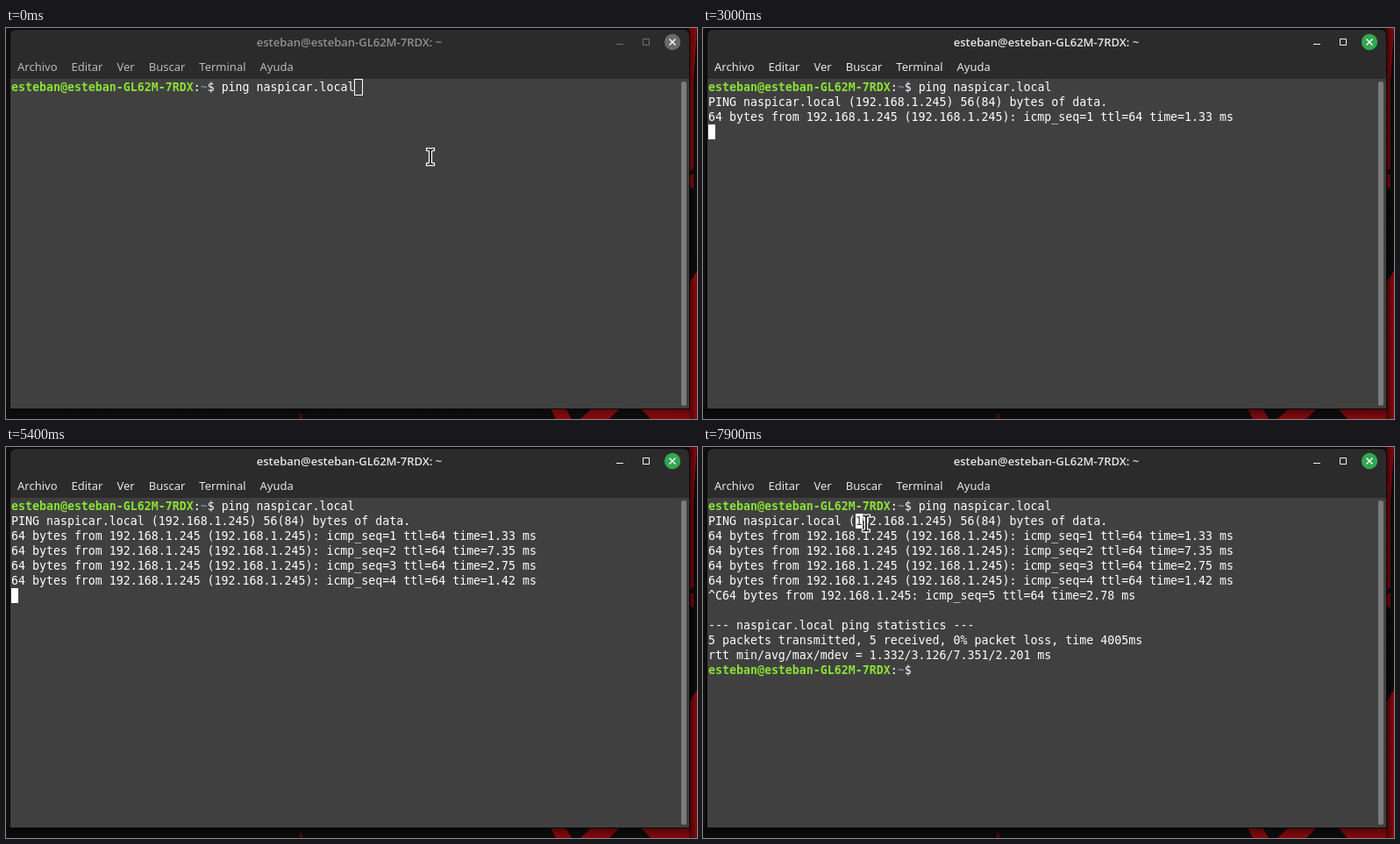
Write an HTML page that moves like this. It is 788 px wide and 446 px high and loops after 8000 ms.

```html
<!DOCTYPE html>
<html lang="es">
<head>
<meta charset="utf-8">
<title>Terminal</title>
<style>
  html, body { margin: 0; width: 100%; height: 100%; overflow: hidden; background: #0e0e0f; }
  svg, #title, #menu, #rows, #caret { position: absolute; }
  svg { left: 0; top: 0; }
  #title, #menu { font: 13px/18px "Noto Sans", "Open Sans", sans-serif; white-space: pre; }
  #title { left: 5px; top: 7px; width: 773px; text-align: center; color: #909090;
           font-family: "Open Sans", "Noto Sans", sans-serif; font-weight: 600; }
  #menu { left: 13px; top: 35px; display: flex; gap: 16px; color: #b9b9b9; }
  .icon { stroke: #707070; fill: none; }
  .close { fill: #696969; }
  .shade { opacity: .75; }
  .focus #title, .focus #menu { color: #e6e6e6; }
  .focus .icon { stroke: #f2f2f2; }
  .focus .close { fill: #33a652; }
  .focus .shade { opacity: 1; }
  /* this size gives an advance of 8px per character */
  #rows { left: 6px; top: 59px; color: #fff; white-space: pre;
          font: 13.288px/17px "DejaVu Sans Mono", monospace; }
  #rows div { height: 17px; }
  .user { font-weight: bold; color: #8ae234; }
  .path { color: #729fcf; }
  #pick { display: inline-block; }
  #pick.on { background: #fff; color: #404040; }
  #caret { width: 8px; height: 17px; box-shadow: 0 0 0 1px #fff; }
  .focus #caret { background: #fff; box-shadow: none; }
</style>
</head>
<body>
<svg width="788" height="446">
  <defs>
    <linearGradient id="sideShade">
      <stop offset="0" stop-opacity=".6"/>
      <stop offset="1" stop-opacity=".12"/>
    </linearGradient>
    <linearGradient id="baseShade" x2="0" y2="1">
      <stop offset="0" stop-opacity=".5"/>
      <stop offset="1" stop-opacity=".12"/>
    </linearGradient>
  </defs>
  <g fill="#990b10">
    <path d="M779 0H788L784 62V160L779 164Z"/>
    <path d="M779 168L784 166V184L779 180Z"/>
    <path d="M788 277L779 291V446H788Z"/>
    <path d="M621 434H638L645 446H627Z"/>
    <path d="M668 434H700L688 446H655Z"/>
    <path d="M724 434H788V446H735Z"/>
    <path d="M334 439L338 441V446H335Z" opacity=".5"/>
  </g>
  <g class="shade">
    <rect x="779" width="9" height="446" fill="url(#sideShade)"/>
    <rect y="434" width="779" height="12" fill="url(#baseShade)"/>
  </g>
  <path d="M4 435V9Q4 1 12 1H772Q780 1 780 9V435Z" fill="#080808"/>
  <path d="M5 434V9Q5 2 12 2H772Q779 2 779 9V434Z" fill="#2b2b2b"/>
  <rect x="5" y="58" width="774" height="376" fill="#404040"/>
  <rect x="770" y="61" width="6" height="370" rx="3" fill="#7b7b7b"/>
  <path class="icon" d="M696 18.5H704M726.5 12.5H733.5V19.5H726.5Z"/>
  <circle class="close" cx="760" cy="16" r="9.2"/>
  <path d="M756.5 12.5L763.5 19.5M763.5 12.5L756.5 19.5" stroke="#fff" stroke-width="1.4"/>
</svg>

<div id="title">esteban@esteban-GL62M-7RDX: ~</div>
<div id="menu"></div>
<div id="caret"></div>
<div id="rows"></div>

<svg width="788" height="446">
  <defs>
    <path id="beam" d="M-3 -8.5H-1.5L0 -7.5L1.5 -8.5H3M0 -7.5V7.5M-3 8.5H-1.5L0 7.5L1.5 8.5H3"/>
  </defs>
  <g id="pointer" fill="none" stroke-linecap="square">
    <use href="#beam" stroke="#fff" stroke-width="4.2"/>
    <use href="#beam" stroke="#111" stroke-width="1.7"/>
  </g>
</svg>
<script>
const LOOP = 8000, STEP = 100, BLINK = 600;
const FOCUS = 500, ENTER = 1800, FIRST_REPLY = 2100, STOP = 6000, DONE = 6100;
const MOVE = 6200, SELECT = 7800;
const $ = id => document.getElementById(id);

const host = 'naspicar.local', ip = '192.168.1.245';
const prompt = '<span class="user">esteban@esteban-GL62M-7RDX</span>:<span class="path">~</span>$ ';
const reply = (ms, i) => `64 bytes from ${ip} (${ip}): icmp_seq=${i + 1} ttl=64 time=${ms} ms`;

const lines = [
  prompt + 'ping ' + host,
  `PING ${host} (<span id="pick">1</span>${ip.slice(1)}) 56(84) bytes of data.`,
  ...['1.33', '7.35', '2.75', '1.42'].map(reply),
  `^C64 bytes from ${ip}: icmp_seq=5 ttl=64 time=2.78 ms`,
  '',
  `--- ${host} ping statistics ---`,
  '5 packets transmitted, 5 received, 0% packet loss, time 4005ms',
  'rtt min/avg/max/mdev = 1.332/3.126/7.351/2.201 ms',
  prompt
];

// one reply per second, then the summary all at once
const shownAt = row => row === 0 ? 0 : row > 5 ? DONE : FIRST_REPLY + 1000 * Math.max(0, row - 2);

// pointer key points: time, x, y
const path = [[MOVE, 484, 147], [6600, 190, 83], [6900, 164, 96], [7600, 178, 85], [7900, 186, 87]];

$('menu').innerHTML = 'Archivo Editar Ver Buscar Terminal Ayuda'.split(' ')
  .map(label => `<span>${label}</span>`).join('');
$('rows').innerHTML = lines.map(text => `<div>${text}</div>`).join('');
const rows = [...$('rows').children];
const show = (node, on) => { node.style.visibility = on ? 'visible' : 'hidden'; };

function pointerAt(t) {
  const next = path.findIndex(point => point[0] > t);
  if (next < 1) return next < 0 ? path[path.length - 1] : path[0];
  const a = path[next - 1], b = path[next];
  const k = (t - a[0]) / (b[0] - a[0]), ease = k * k * (3 - 2 * k);
  return a.map((v, i) => v + (b[i] - v) * ease);
}

function drawCaret(t, count) {
  const typing = t < ENTER || t >= DONE;
  const row = typing ? count - 1 : count;
  const col = typing ? rows[row].textContent.length : 0;
  $('caret').style.left = 6 + col * 8 + 'px';
  $('caret').style.top = 59 + row * 17 + 'px';
  // each key press restarts the blink
  const pressed = t >= STOP ? STOP : t >= ENTER ? ENTER : BLINK;
  show($('caret'), Math.floor(Math.max(0, t - pressed) / BLINK) % 2 === 0);
}

function draw(time) {
  const t = Math.floor(time / STEP) * STEP;
  document.body.classList.toggle('focus', t >= FOCUS);
  rows.forEach((node, row) => show(node, t >= shownAt(row)));
  drawCaret(t, rows.filter((node, row) => t >= shownAt(row)).length);

  const [, x, y] = pointerAt(t);
  $('pointer').setAttribute('transform', `translate(${Math.round(x)} ${Math.round(y)})`);
  show($('pointer'), t < ENTER || t >= MOVE);
  $('pick').classList.toggle('on', t >= SELECT);
}

const start = performance.now();
function tick(now) {
  draw(Math.max(0, now - start) % LOOP);
  requestAnimationFrame(tick);
}
draw(0);
requestAnimationFrame(tick);
</script>
</body>
</html>
```
